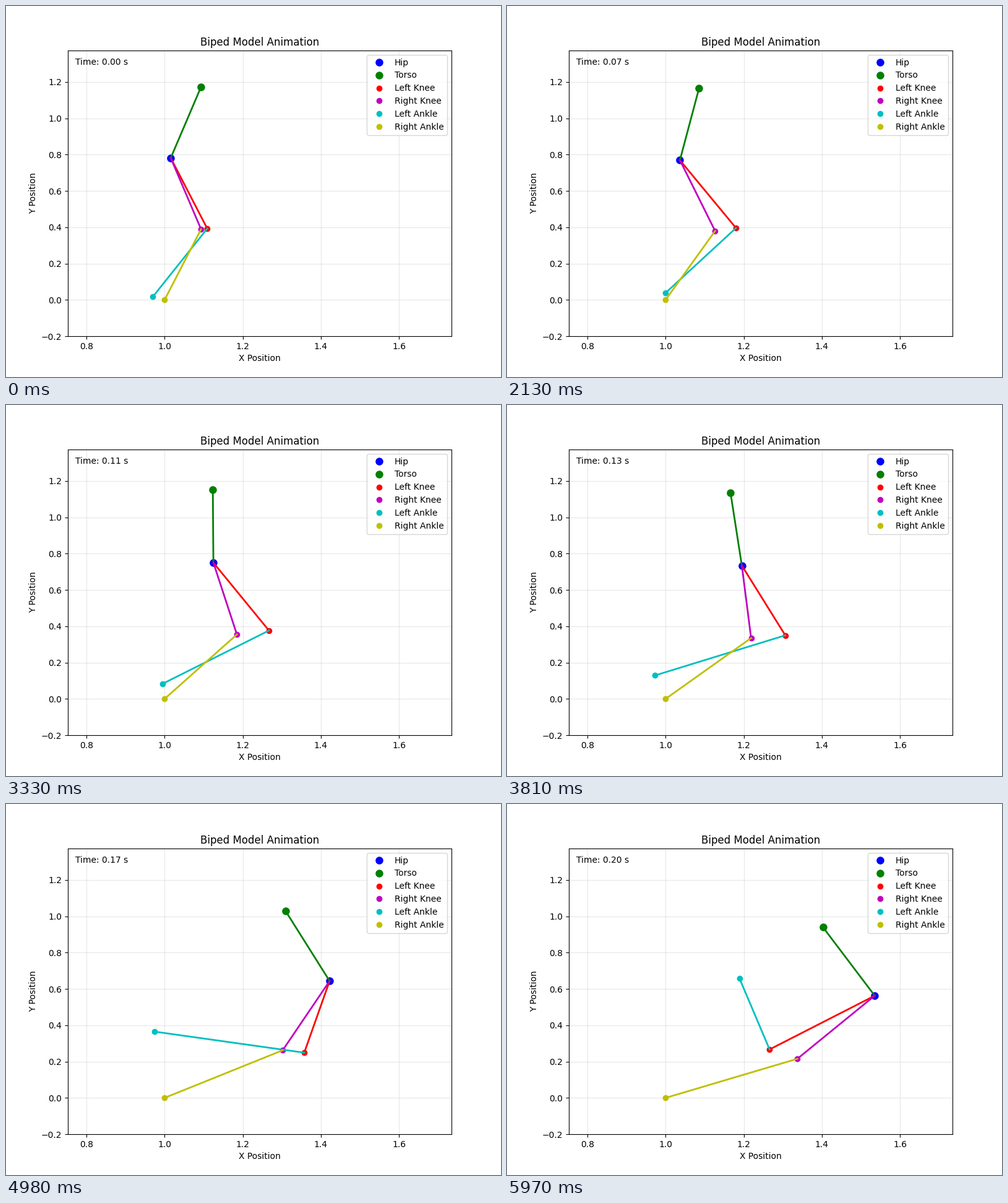
A matplotlib script that plays this animation: 800x600 px, repeating every 6 s.

```python
import numpy as np
import matplotlib.pyplot as plt
from matplotlib.animation import FuncAnimation

FRAMES = 200
INTERVAL = 30   # ms
DT = 0.001      # simulated seconds per step
LINK = 0.4      # length of every body segment

# Segment angles from the vertical (rad) at a few steps of the simulation
STEPS = np.array([0, 40, 71, 111, 142, 166, 199], float)
ANGLES = {
    "r_shin":  [0.2355, 0.2575, 0.3225, 0.481, 0.685, 0.8565, 1.003],
    "r_thigh": [-0.1952, -0.2040, -0.2272, -0.151, 0.063, 0.305, 0.518],
    "torso":   [0.1957, 0.187, 0.123, -0.0036, -0.1506, -0.2845, -0.338],
    "l_thigh": [0.2358, 0.2973, 0.367, 0.3635, 0.151, -0.163, -0.738],
    "l_shin":  [-0.3554, -0.3813, -0.467, -0.7484, -1.277, -1.8646, -2.947],
}
END_RATE = {"r_shin": 0.0025, "r_thigh": 0.0022, "torso": 0.0005,
            "l_thigh": -0.019, "l_shin": -0.037}


def spline(x, y, end_rate, t):
    """Cubic spline that starts at rest and ends with a given slope."""
    y = np.asarray(y)
    n, h = len(x), np.diff(x)
    slope = np.diff(y) / h
    a, b = np.eye(n), np.zeros(n)
    b[-1] = end_rate
    for i in range(1, n - 1):
        a[i, i - 1:i + 2] = h[i], 2 * (h[i - 1] + h[i]), h[i - 1]
        b[i] = 3 * (h[i] * slope[i - 1] + h[i - 1] * slope[i])
    d = np.linalg.solve(a, b)
    k = np.clip(np.searchsorted(x, t, side="right") - 1, 0, n - 2)
    u = (t - x[k]) / h[k]
    return ((1 + 2 * u) * (1 - u) ** 2 * y[k] + u * u * (3 - 2 * u) * y[k + 1]
            + h[k] * u * (1 - u) * ((1 - u) * d[k] - u * d[k + 1]))


def link(angle):
    return LINK * np.stack([np.sin(angle), np.cos(angle)], axis=-1)


def solve_pose():
    t = np.arange(FRAMES)
    q = {name: spline(STEPS, vals, END_RATE[name], t)
         for name, vals in ANGLES.items()}
    down = np.array([1, -1])
    r_ankle = np.tile([1.0, 0.0], (FRAMES, 1))
    r_knee = r_ankle + link(q["r_shin"])
    hip = r_knee + link(q["r_thigh"])
    l_knee = hip + link(q["l_thigh"]) * down
    return {
        "Hip": hip,
        "Torso": hip + link(q["torso"]),
        "Left Knee": l_knee,
        "Right Knee": r_knee,
        "Left Ankle": l_knee + link(q["l_shin"]) * down,
        "Right Ankle": r_ankle,
    }


pose = solve_pose()

fig, ax = plt.subplots(figsize=(8, 6), dpi=100)
ax.set_xlim(0.7525, 1.7343)
ax.set_ylim(-0.2, 1.373)
ax.set_xlabel("X Position")
ax.set_ylabel("Y Position")
ax.set_title("Biped Model Animation")
ax.grid(True, alpha=0.3)

JOINTS = [("Hip", "b", 8), ("Torso", "g", 8), ("Left Knee", "r", 6),
          ("Right Knee", "m", 6), ("Left Ankle", "c", 6), ("Right Ankle", "y", 6)]
BONES = [("Hip", "Torso", "g"), ("Hip", "Left Knee", "r"),
         ("Hip", "Right Knee", "m"), ("Left Knee", "Left Ankle", "c"),
         ("Right Knee", "Right Ankle", "y")]

dots = {name: ax.plot([], [], color + "o", markersize=size, label=name)[0]
        for name, color, size in JOINTS}
bones = [(a, b, ax.plot([], [], color + "-", lw=2)[0]) for a, b, color in BONES]
clock = ax.text(0.02, 0.95, "", transform=ax.transAxes)
ax.legend(loc="upper right")


def update(i):
    for name, dot in dots.items():
        dot.set_data(pose[name][i, :1], pose[name][i, 1:])
    for a, b, line in bones:
        line.set_data(*zip(pose[a][i], pose[b][i]))
    clock.set_text(f"Time: {i * DT:.2f} s")
    return [*dots.values(), *(line for *_, line in bones), clock]


anim = FuncAnimation(fig, update, frames=FRAMES, interval=INTERVAL,
                     repeat=True, repeat_delay=0)
plt.show()
```
